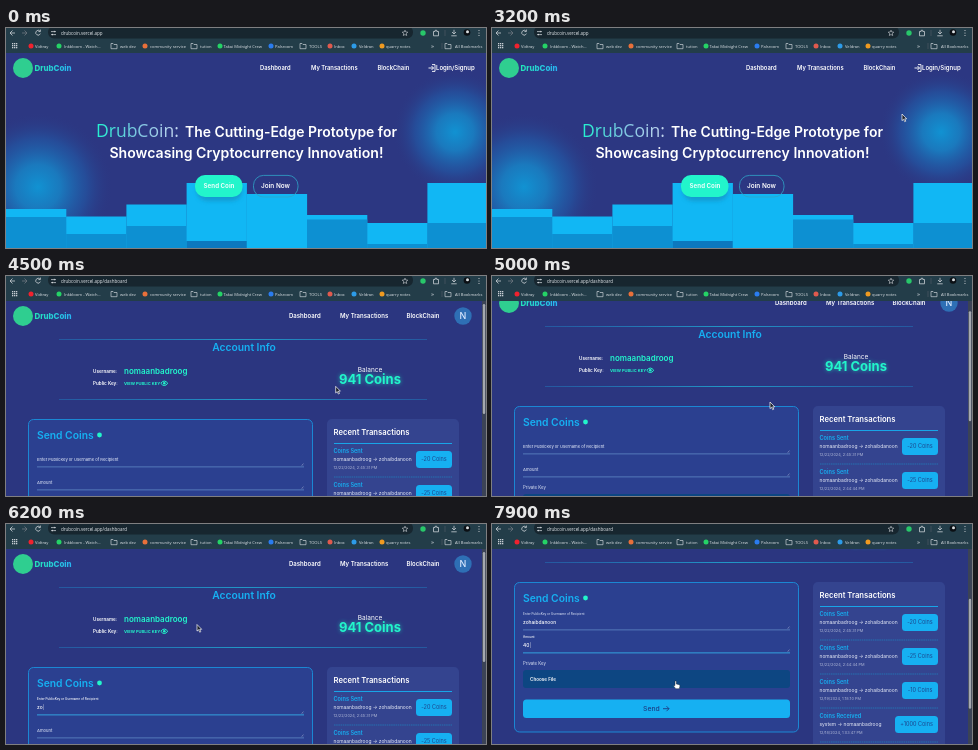
Recreate the animation shown at these times as an HTML page. Size 480 by 220 pixels, loop 8000 ms.

```html
<!DOCTYPE html>
<html lang="en">
<head>
<meta charset="utf-8">
<title>DrubCoin</title>
<style>
  html, body { margin: 0; width: 100%; height: 100%; overflow: hidden; background: #2b3680; }
  svg { display: block; width: 480px; height: 220px; }
  text { font-family: Inter, sans-serif; white-space: pre; }
  .ui { font-family: "Open Sans", "Noto Sans", sans-serif; }
</style>
</head>
<body>
<svg id="stage" viewBox="0 0 480 220" xmlns="http://www.w3.org/2000/svg"></svg>
<script>
const LOOP = 8000, CYAN = '#16b0f2', MINT = '#22f5cb';
const USER = 'nomaanbadroog', FRIEND = 'zohaibdanoon';

// Markup helpers
const text = (x, y, s, size, fill = '#fff', weight = 600, extra = '') =>
  `<text x="${x}" y="${y}" font-size="${size}" fill="${fill}" font-weight="${weight}" ${extra}>${s}</text>`;
const ui = (x, y, s, size = 4.1, fill = '#dfe4e8', extra = '') =>
  text(x, y, s, size, fill, 500, `class="ui" ${extra}`);
const rect = (x, y, w, h, fill, r = 0, extra = '') =>
  `<rect x="${x}" y="${y}" width="${w}" height="${h}" fill="${fill}" rx="${r}" ${extra}/>`;
const dot = (x, y, r, fill, extra = '') => `<circle cx="${x}" cy="${y}" r="${r}" fill="${fill}" ${extra}/>`;
const line = (d, stroke = '#c8ced4', w = .8, extra = '') =>
  `<path d="${d}" fill="none" stroke="${stroke}" stroke-width="${w}" ${extra}/>`;
const folder = x => line(`M${x - 3} 15.5h2l1 1h3v4.2h-6z`, '#c8ced4', .7);
const middle = 'text-anchor="middle"';

function browser() {
  const marks = [
    [25, 29, 'Vidtray', '#f0222e'], [53, 58, 'Inkbloom - Watch...', '#25d366'], [108, 114, 'web dev'],
    [139, 144, 'community service', '#e8703a'], [188, 194, 'tution'],
    [214, 217.5, 'Takai Midnight Crew', '#25d366'], [265, 269, 'Palsroom', '#2a7cf0'], [297, 303, 'TOOLS'],
    [324, 328, 'Inbox', '#e05a4e'], [348, 353, 'Veldran', '#2d9be8'], [376, 380, 'quarry notes', '#f09a20'],
    [442, 449, 'All Bookmarks']
  ];
  const apps = [0, 1, 2].flatMap(i => [0, 1, 2].map(j => rect(6 + i * 2, 15 + j * 2, 1.3, 1.3, '#c8ced4')));
  return rect(0, 0, 480, 25, '#233d49') + rect(42, -2, 365, 12.5, '#17262f', 6) +
    line('M9 5H4M6.5 2.5L4 5l2.5 2.5') + line('M16 5h5M18.5 2.5L21 5l-2.5 2.5', '#6f7880') +
    line('M34 3.2a2.4 2.4 0 1 0 .4 2.4M34.4 1.6v2h-2') +
    line('M45 3.6h2.5M49 3.6h1M45 6.6h1M47.5 6.6h2.5') + dot(48.2, 3.6, .8, '#d0d4d8') + dot(46.7, 6.6, .8, '#d0d4d8') +
    line('M399 2.2l.8 1.8 2 .2-1.5 1.3.4 2-1.7-1-1.7 1 .4-2-1.5-1.3 2-.2z', '#d0d4d8', .6) +
    dot(417, 5, 2.7, '#28c76a') + line('M427.5 3.5h1.6v-1.2h1.7v1.2h1.7v4.3h-5z', '#c8ced4', .8) +
    line('M439 2v6', '#56616a', .6) + line('M448 1.8v4M446 4l2 2 2-2M445.3 7.8h5.4') +
    dot(461, 4.5, 3.3, '#0b0f14') + dot(461.5, 3.7, 1.5, '#d9dde0') +
    [2.5, 5, 7.5].map(y => dot(473, y, .6, '#d0d4d8')).join('') + apps.join('') +
    marks.map(([i, x, s, c]) => (c ? dot(i, 18, 2.5, c) : folder(i)) + ui(x, 19.5, s)).join('') +
    ui(425, 20, '»', 6) + line('M436 15v6', '#56616a', .6);
}

const brand = y => dot(17, y, 10, '#2fce90') + text(28.5, y + 3, 'DrubCoin', 7.9, 'url(#brand)', 800);

function home() {
  const tops = [181, 188.5, 176.5, 155, 166, 187, 195, 155];
  const fronts = [189, 206, 198, 213, 220, 191.5, 216, 195];
  const blocks = tops.map((y, i) => rect(i * 60.2, y, 60.3, 220 - y, '#11b7f4') +
    rect(i * 60.2, fronts[i], 60.3, 220 - fronts[i], i == 3 ? '#0c78be' : '#0d90d2')).join('');
  return rect(0, 25, 480, 195, '#2c3782') + dot(32, 159, 75, 'url(#glow)') + dot(449, 104, 62, 'url(#glow)') + blocks + brand(40) +
    text(254, 42.2, 'Dashboard', 5.8) + text(305, 42.2, 'My Transactions', 5.8) + text(371.5, 42.2, 'BlockChain', 5.8) +
    line('M422.5 40h5M425.5 38l2 2-2 2M426 36.6h3v6.8h-3', '#fff', .9) + text(430, 42.2, 'Login/Signup', 6) +
    text(90, 109, 'DrubCoin:', 17.5, 'url(#title)', 500, 'class="ui"') +
    text(179, 109, 'The Cutting-Edge Prototype for', 13.95) +
    text(240.5, 130, 'Showcasing Cryptocurrency Innovation!', 14.1, '#fff', 600, middle) +
    rect(191, 151, 45, 22, '#1488b8', 10, 'opacity=".6" filter="url(#soft)"') +
    rect(189, 147, 47.5, 22, MINT, 10) + text(213, 160.2, 'Send Coin', 6.2, '#e9fffb', 700, middle) +
    rect(247.5, 147.4, 44.5, 21.6, 'none', 10, 'stroke="#2fa5c8" stroke-width=".8"') +
    text(269.5, 160.2, 'Join Now', 6.4, '#fff', 600, middle);
}

function transaction([title, from, to, date, amount], i) {
  const y = 175 + i * 34, w = amount.length > 9 ? 43 : 36;
  return text(327.5, y + 2, title, 5.6, CYAN) + text(327.5, y + 10, `${from} → ${to}`, 4.9, '#e8ecf8', 400) +
    text(327.5, y + 17.5, date, 3.9, '#aeb6d6', 400) + rect(446 - w, y, w, 17, CYAN, 3.5) +
    text(446 - w / 2, y + 10.4, amount, 5.5, '#1c478f', 400, middle) +
    line(`M328 ${y + 26}H446`, '#1d86c0', .7, 'stroke-dasharray="1.5 .7"');
}

function dashboard() {
  const rows = [
    ['Coins Sent', USER, FRIEND, '12/22/2024, 2:45:31 PM', '-20 Coins'],
    ['Coins Sent', USER, FRIEND, '12/22/2024, 2:44:44 PM', '-25 Coins'],
    ['Coins Sent', USER, FRIEND, '12/19/2024, 1:18:10 PM', '-10 Coins'],
    ['Coins Received', 'system', USER, '12/18/2024, 1:03:47 PM', '+1000 Coins']
  ];
  return brand(40) + text(283, 42.2, 'Dashboard', 6) + text(334, 42.2, 'My Transactions', 6) + text(400.5, 42.2, 'BlockChain', 6) +
    dot(457, 40, 8.7, '#2e6fb5') + text(457, 43.2, 'N', 9, '#dceaff', 500, middle) +
    rect(53, 63, 368, .8, 'url(#rule)') + text(238, 75, 'Account Info', 10.3, CYAN, 600, middle) +
    text(87, 97, 'Username:', 4.6) + text(118, 97.7, USER, 8, MINT) +
    text(87, 108.7, 'Public Key:', 4.6) + text(118, 108.7, 'VIEW PUBLIC KEY', 4.1, MINT, 700) +
    line('M154.8 107.3q3.5-4.5 7 0q-3.5 4.5-7 0z', MINT, 1) + dot(158.3, 107.3, 1.3, MINT) +
    text(364, 95.5, 'Balance', 6.5, '#fff', 400, middle) +
    text(364, 108, '941 Coins', 13, MINT, 700, middle + ' filter="url(#soft)" opacity=".6"') +
    text(364, 108, '941 Coins', 13, MINT, 700, middle) + rect(53, 123, 368, .8, 'url(#rule)') +
    rect(22.5, 143.5, 284, 149.5, '#2b4090', 5, 'stroke="#1a90dc" stroke-width=".9"') +
    text(31, 163, 'Send Coins', 10.3, CYAN) + dot(93.5, 159, 2.4, MINT) +
    `<g id="fields"></g>` + text(31, 226, 'Private Key', 4.3, '#dfe6f6', 400) +
    rect(31, 231, 267, 18, '#0d4682', 3) + text(38, 241.8, 'Choose File', 4.6) +
    rect(31, 260.5, 267, 18.5, CYAN, 3.5) + text(151, 272, 'Send', 6.8, '#1b3f86', 500) +
    line('M171 269.7h6M174.5 267.2l2.5 2.5-2.5 2.5', '#1b3f86', .9) +
    rect(321, 143, 132, 172, '#34448f', 5) + text(327.5, 159, 'Recent Transactions', 7.7) +
    rect(328, 167, 118, .9, CYAN) + rows.map(transaction).join('');
}

document.getElementById('stage').innerHTML = `
<defs>
  <radialGradient id="glow"><stop stop-color="#1192d2"/><stop offset=".3" stop-color="#1785c8" stop-opacity=".85"/><stop offset=".65" stop-color="#1f62b0" stop-opacity=".5"/><stop offset="1" stop-color="#2c3782" stop-opacity="0"/></radialGradient>
  <linearGradient id="title"><stop stop-color="#20f3d0"/><stop offset=".5" stop-color="#7cc4e0"/><stop offset="1" stop-color="#c4d6f0"/></linearGradient>
  <linearGradient id="brand"><stop stop-color="#22e6b8"/><stop offset="1" stop-color="#28b4f4"/></linearGradient>
  <linearGradient id="rule"><stop stop-color="#1aa0e0" stop-opacity=".4"/><stop offset=".5" stop-color="#1fb0d8"/><stop offset="1" stop-color="#1aa0e0" stop-opacity=".4"/></linearGradient>
  <filter id="soft" x="-30%" y="-60%" width="160%" height="220%"><feGaussianBlur stdDeviation="2.2"/></filter>
</defs>
${rect(0, 0, 480, 220, '#2b3680')}
<g id="home">${home()}</g>
<g id="loader"></g>
<g id="dash"><g id="page">${dashboard()}</g>${rect(476, 25, 4, 195, '#3b4356')}${rect(476.8, 28, 2.4, 110, '#a4a8b0', 1.2, 'id="thumb"')}</g>
${browser()}
<g id="select">${rect(42.5, -2, 364, 12.2, 'none', 6, 'stroke="#8cc8f0" stroke-width="1"')}${rect(54.5, 1.3, 43.5, 7.6, '#8fc4ee')}
${rect(353, 1, 39, 8, '#17456a', 4)}${dot(357.5, 5, 1.7, '#d5e8f8')}${ui(361.5, 6.5, 'Quarry View', 4.3, '#e4f0fa')}</g>
<text id="url" class="ui" x="55" y="6.7" font-size="4.5" font-weight="500"></text>
<g id="cursor"><path id="arrow" d="M0 0V6.6L1.6 5.2L2.7 7.7L3.8 7.2L2.7 4.8H4.7Z" fill="#1a1f2a" stroke="#fff" stroke-width=".7"/>
<path id="hand" d="M0 .2q.8-.6 1.3.1V3l2.9.7q.9.4.7 1.5L4.2 7.7H.8L-1.4 5q0-1 1.4-.4z" fill="#fff" stroke="#1a1f2a" stroke-width=".4"/></g>`;

const el = id => document.getElementById(id);
const show = (id, on) => el(id).setAttribute('display', on ? 'inline' : 'none');
const shift = (id, x, y) => el(id).setAttribute('transform', `translate(${x} ${y})`);

// Interpolates rows of [time, ...values]
function track(keys, t) {
  const i = keys.findIndex(k => k[0] > t);
  if (i < 0) return keys[keys.length - 1].slice(1);
  if (i == 0) return keys[0].slice(1);
  const a = keys[i - 1], b = keys[i], p = (t - a[0]) / (b[0] - a[0]), e = p * p * (3 - 2 * p);
  return a.slice(1).map((v, n) => v + (b[n + 1] - v) * e);
}

const POINTER = [[0, 484, 40], [300, 470, 60], [800, 392, 83.5], [1700, 392, 83.5], [1800, 415, 105], [1900, 410, 86],
  [4100, 410, 86], [4800, 278, 126], [5000, 278, 126], [5500, 110, 182], [5750, 110, 182], [6150, 191, 100.5],
  [6600, 191, 100.5], [6950, 110, 206], [7300, 110, 206], [7700, 183, 157]];
const SCROLL = [[4700, 0], [5000, 13], [5350, 0], [7300, 0], [7600, 85]];

// Four cubes circling on an isometric floor; p is the loop phase
function cubes(p) {
  const S = 8.34, H = 10.2, a = Math.min(p * 2, 1), b = Math.max(p * 2 - 1, 0);
  const spots = [[1 + b, 0], [b, 1 - a], [1 - b, 1], [2 - b, a]].sort((m, n) => m[0] + m[1] - n[0] - n[1]);
  const at = (x, y, z) => `${(240.3 + (x - y) * S).toFixed(2)},${(129 + (x + y) * S / 2 + z).toFixed(2)}`;
  const face = (fill, ...pts) => `<polygon fill="${fill}" points="${pts.map(q => at(...q)).join(' ')}"/>`;
  const flat = (x, y, z, fill) => face(fill, [x, y, z], [x + 1, y, z], [x + 1, y + 1, z], [x, y + 1, z]);
  return spots.map(([x, y]) => flat(x, y, 33, '#dbe3f4')).join('') + spots.map(([x, y]) =>
    face(MINT, [x, y + 1, 0], [x + 1, y + 1, 0], [x + 1, y + 1, H], [x, y + 1, H]) +
    face('#174aa8', [x + 1, y, 0], [x + 1, y + 1, 0], [x + 1, y + 1, H], [x + 1, y, H]) +
    flat(x, y, 0, '#16aef0')).join('');
}

function field(label, value, y, focused) {
  const raised = focused || value;
  const caret = focused ? '<tspan font-weight="300">|</tspan>' : '';
  return text(31, raised ? y - 7.5 : y + 1.5, label, raised ? 3.1 : 4.1, focused ? '#fff' : '#cfd7ee', 500) +
    (raised ? text(31, y + 1.7, value + caret, 4.9, '#fff', 500) : '') +
    rect(31, y + 7.5, 267, .8, focused ? '#35b8f2' : '#5f86c4') +
    line(`M295.5 ${y + 6.5}l2-2M296.8 ${y + 6.5}l.7-.7`, '#b8c4e0', .4);
}

function draw(t) {
  const onHome = t < 3500, onDash = t >= 4100, selected = t >= 3300 && !onDash;
  show('home', onHome);
  show('dash', onDash);
  show('loader', !onHome && !onDash);
  show('select', selected);
  el('url').textContent = 'drubcoin.vercel.app' + (onDash ? '/dashboard' : '');
  el('url').setAttribute('fill', selected ? '#1d3550' : '#e6eaee');
  if (!onHome && !onDash) el('loader').innerHTML = cubes(((t - 3800) / 800 + 1.25) % 1);
  if (onDash) {
    const [scroll] = track(SCROLL, t);
    shift('page', 0, -scroll);
    el('thumb').setAttribute('y', 28 + scroll * .55);
    const typed = FRIEND.slice(0, Math.max(0, Math.floor((t - 6080) / 60)));
    const amount = '40'.slice(0, Math.max(0, Math.floor((t - 7000) / 100)));
    el('fields').innerHTML = field('Enter PublicKey or Username of Recipient', typed, 183, t >= 5700 && t < 7000) +
      field('Amount', amount, 206, t >= 7000);
  }
  const [x, y] = track(POINTER, t);
  shift('cursor', x, y);
  show('hand', t >= 7650);
  show('arrow', t < 7650);
}

const start = performance.now();
function tick() {
  draw((performance.now() - start) % LOOP);
  requestAnimationFrame(tick);
}
tick();
</script>
</body>
</html>
```
